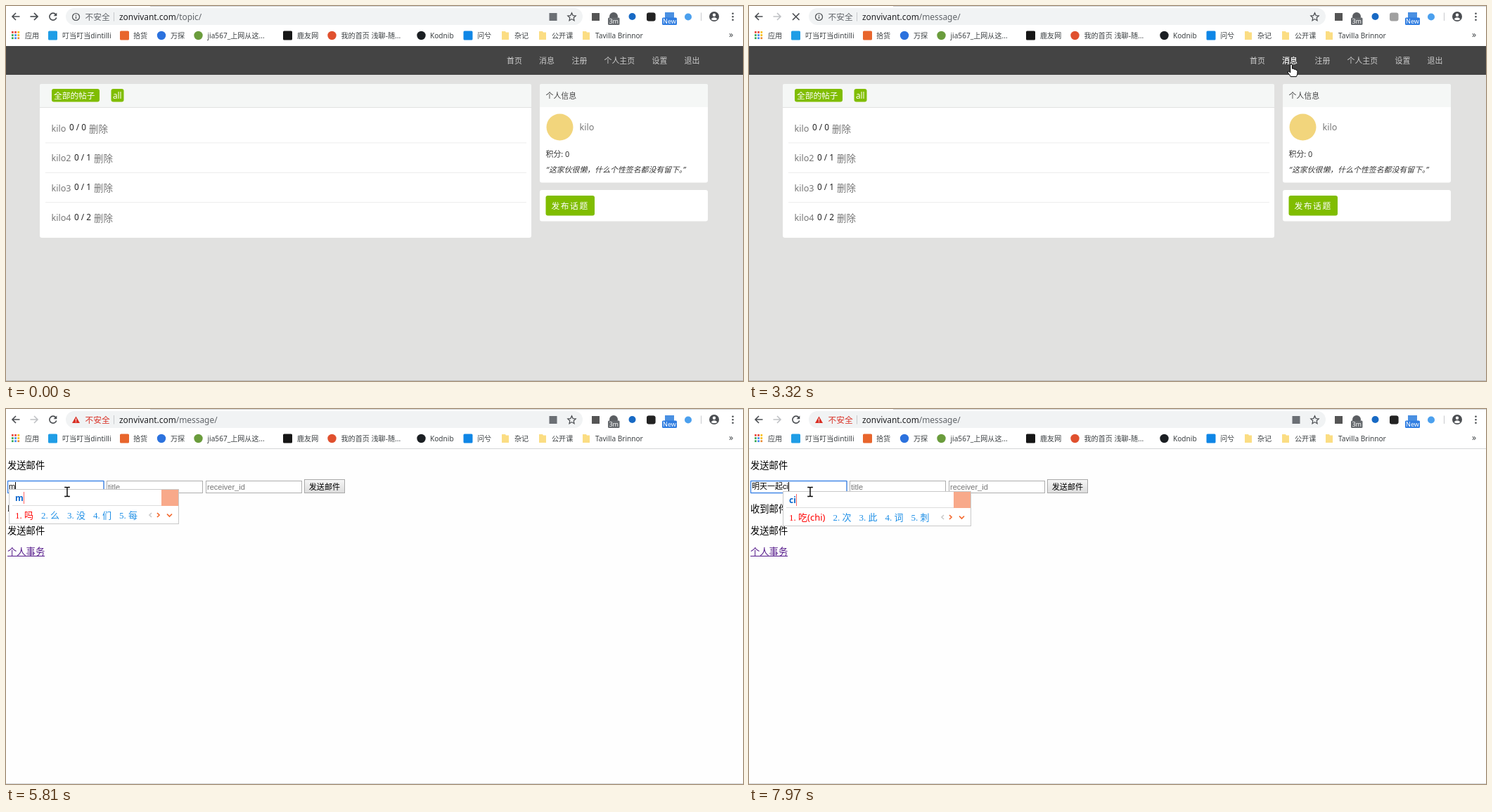
Write an HTML page that moves like this. It is 1048 by 534 pixels and loops after 8 s.

```html
<!DOCTYPE html>
<html lang="zh-CN">
<head>
<meta charset="utf-8">
<title>Forum messages</title>
<style>
  html, body { margin: 0; width: 100%; height: 100%; overflow: hidden; background: #fff; }
  body { position: relative; font-family: "Noto Sans", "Noto Sans CJK SC", "Noto Sans CJK", sans-serif; }
  svg.stage { position: absolute; left: 0; top: 0; width: 1048px; height: 534px; }
  .url { font-size: 11.9px; fill: #202124; }
  .url .dim { fill: #5f6368; }
  .url .warn { fill: #d93025; }
  .marks { font-size: 10.1px; fill: #3c4043; }
  .nav { font-size: 10.9px; fill: #ccc; }
  .side { font-size: 10.9px; fill: #333; }
  .row { font-size: 12.6px; fill: #777; }
  .row .count { font-size: 11.8px; fill: #222; }
  .row .del { font-size: 13.4px; }
  .mail { font-size: 13.3px; }
  .hint { font: 11px "Liberation Sans", "Noto Sans CJK SC", sans-serif; fill: #757575; }
  .line { fill: none; stroke: #4a4d51; stroke-width: 1.6; }

  .typed { position: absolute; left: 4px; top: 104.4px; white-space: pre; border-right: 1px solid #000;
    font: 11px/13px "Liberation Sans", "Noto Sans CJK SC", "Noto Sans CJK", sans-serif; }
  .ime { position: absolute; box-sizing: border-box; height: 50px; padding: 0 7px 0 8.5px;
    border: 1px solid #c9c9c9; background: #fff; white-space: nowrap; font-size: 13px; color: #1e8fe6; }
  .ime .pinyin { height: 22px; font: bold 12px/23px "Open Sans", sans-serif; color: #0a66cc; }
  .ime .pinyin span { border-right: 1px solid #f66; }
  .ime .list { display: flex; align-items: center; gap: 11px; height: 25px;
    border-top: 1px solid #ddd; margin: 0 -5px 0 -4px; padding: 0 5px 0 4px; }
  .ime .list b { display: inline-block; width: 1em; font: 13px "Liberation Serif", serif; }
  .ime .list span:first-child { color: #f00; }
  .ime .logo { position: absolute; right: 0; top: 0; width: 24px; height: 23px; background: #f8a98a; }

  #cursor { animation: move 8s linear infinite; }
  #cursor path { fill: #fff; stroke: #000; stroke-linejoin: round; }
  @keyframes move {
    0%, .95% { transform: translate(966px, 545px); }
    1% { transform: translate(963px, 520px); }
    4% { transform: translate(840px, 370px); }
    6.8% { transform: translate(739px, 225px); }
    8.5% { transform: translate(752px, 178px); }
    10.4%, 11.1% { transform: translate(771px, 155px); }
    19.4%, 23.2% { transform: translate(771px, 87px); }
    24%, 45% { transform: translate(771px, 83px); }
    47.75%, 49.2% { transform: translate(312px, 151px); }
    50.5% { transform: translate(280px, 155px); }
    53.5% { transform: translate(142px, 138px); }
    56.5%, 59.7% { transform: translate(86.3px, 118px); }
    59.8%, 100% { transform: translate(87px, 118px); }
  }
</style>
</head>
<body>
<svg class="stage" viewBox="0 0 1048 534">
  <!-- topic page -->
  <g data-show="0 3420">
    <rect y="57" width="1048" height="477" fill="#e1e1e0"/>
    <rect y="57" width="1048" height="41" fill="#444"/>
    <g class="nav">
      <text x="712" y="82.3">首页</text><text x="758" y="82.3">消息</text><text x="804.5" y="82.3">注册</text>
      <text x="850.5" y="82.3">个人主页</text><text x="918.5" y="82.3">设置</text><text x="964.5" y="82.3">退出</text>
      <text x="758" y="82.3" fill="#fff" data-show="1470">消息</text>
    </g>
    <rect x="48" y="111" width="699" height="219" rx="3" fill="#fff"/>
    <path d="M48 144.5V114a3 3 0 0 1 3-3H744a3 3 0 0 1 3 3V144.5z" fill="#f5f7f6"/>
    <path d="M48 144.5H747" stroke="#e2e2e2"/>
    <g fill="#80bd01">
      <rect x="65" y="118" width="68" height="18.5" rx="3"/>
      <rect x="149.5" y="118" width="18" height="18.5" rx="3"/>
    </g>
    <g fill="#fff" font-size="11.7"><text x="68" y="132">全部的帖子</text><text x="152" y="132">all</text></g>
    <g id="rows" class="row"></g>

    <g class="side">
      <rect x="759" y="111" width="239" height="140.5" rx="3" fill="#fff"/>
      <path d="M759 144V114a3 3 0 0 1 3-3H995a3 3 0 0 1 3 3V144z" fill="#f5f7f6"/>
      <text x="767.5" y="131.8" fill="#444">个人信息</text>
      <circle cx="787.5" cy="172.5" r="19" fill="#f2d57c"/>
      <text x="815.5" y="177" font-size="12.6" fill="#777">kilo</text>
      <text x="767.5" y="215.2">积分: 0</text>
      <text x="768" y="237.2" font-style="italic">“这家伙很懒，什么个性签名都没有留下。”</text>
      <rect x="759" y="262" width="239" height="44.5" rx="3" fill="#fff"/>
      <rect x="767.5" y="270" width="69.5" height="28.5" rx="3" fill="#80bd01"/>
      <text x="775.5" y="289.4" font-size="11.8" letter-spacing="1.5" fill="#fff">发布话题</text>
    </g>
    <path d="M0 533.5H1048" stroke="#b9b9b9"/>
  </g>

  <!-- message page -->
  <g data-show="3420">
    <rect y="57" width="1048" height="477" fill="#fefefe"/>
    <path d="M0 56.5H1048M0 533.5H1048" stroke="#d5d6d8"/>
    <g class="mail">
      <text x="2" y="84.6">发送邮件</text><text x="2" y="147">收到邮件</text><text x="2" y="177.5">发送邮件</text>
      <text x="2" y="207.6" fill="#551a8b">个人事务</text>
      <path d="M2 209.5H55" stroke="#551a8b"/>
    </g>
    <g fill="#fff" stroke="#adadad">
      <rect x="2.5" y="102.5" width="136.5" height="17"/>
      <rect x="143.5" y="102.5" width="136" height="17"/>
      <rect x="284.5" y="102.5" width="136" height="17"/>
      <rect x="2.5" y="102.5" width="136.5" height="17" rx=".5" stroke="#4489e8" stroke-width="1.4" data-show="4780"/>
    </g>
    <linearGradient id="face" x2="0" y2="1"><stop stop-color="#f6f6f6"/><stop offset="1" stop-color="#dcdcdc"/></linearGradient>
    <rect x="424.5" y="100.5" width="57" height="19" fill="url(#face)" stroke="#a9a9a9"/>
    <g class="hint">
      <text x="4" y="115" data-show="3420 5810">content</text><text x="145" y="115">title</text><text x="286" y="115">receiver_id</text>
      <text x="430.7" y="115.2" font-size="11.1" fill="#000">发送邮件</text>
    </g>
    <path d="M4.5 105V117" stroke="#000" data-show="4780 5360"/>
  </g>

  <!-- browser bar -->
  <path d="M205 .5H1048" stroke="#cfd1d4"/>
  <rect x="85" y="3" width="735" height="24" rx="12" fill="#f1f3f4"/>
  <g class="line">
    <path d="M19.5 15H9M14 10L9 15L14 20"/>
    <path d="M34.5 15H45M40 10L45 15L40 20" stroke="#c0c2c5"/>
    <path d="M34.5 15H45M40 10L45 15L40 20" data-show="0 3320"/>
    <g data-show="0 2980 3420">
      <path d="M70.8 12A5 5 0 1 0 71.7 16.5"/><path d="M72.3 9.5V14.2H67.6z" fill="#4a4d51" stroke="none"/>
    </g>
    <path d="M62 10.5L71.5 20M71.5 10.5L62 20" data-show="2980 3420"/>
    <g data-show="0 5810" stroke-width="1.2">
      <circle cx="99.5" cy="15.5" r="5"/><path d="M99.5 14.8V18.3M99.5 12.5V13.7"/>
    </g>
    <path d="M804.5 9.8L806.2 13.6L810.2 14L807.2 16.7L808 20.7L804.5 18.6L801 20.7L801.8 16.7L798.8 14L802.8 13.6z" stroke-width="1.2"/>
    <path d="M153.5 9V21.5M988.5 9.5V21" stroke="#c8cacd" stroke-width="1"/>
  </g>
  <g data-show="5810">
    <path d="M99.5 10.5L105 20H94z" fill="#d93025"/><path d="M99.5 13.5V16.8M99.5 17.7V18.9" stroke="#fff"/>
  </g>
  <g class="url">
    <text x="112.5" y="19.8" font-size="11.7" class="dim" data-show="0 5810">不安全</text>
    <text x="112.5" y="19.8" font-size="11.7" class="warn" data-show="5810">不安全</text>
    <text x="161" y="19.5" data-show="0 3320">zonvivant.com<tspan class="dim">/topic/</tspan></text>
    <text x="161" y="19.5" data-show="3320">zonvivant.com<tspan class="dim">/message/</tspan></text>
  </g>
  <rect x="772.5" y="10" width="11" height="11" fill="#6b6f74" data-show="0 3320 3420"/>
  <rect x="833" y="10" width="11" height="11" fill="#555"/>
  <circle cx="864" cy="15" r="6" fill="#5a5d61"/>
  <circle cx="890.5" cy="15" r="5" fill="#1769c4"/>
  <rect x="911" y="9.5" width="12.5" height="12" rx="3" fill="#a0a0a0"/>
  <rect x="911" y="9.5" width="12.5" height="12" rx="3" fill="#222" data-show="0 3320 3420"/>
  <rect x="937" y="9" width="13" height="12" fill="#4a90e2"/>
  <circle cx="970" cy="15.5" r="5" fill="#4ba0ee"/>
  <rect x="856" y="16.5" width="16.5" height="10.5" rx="1.5" fill="#666a6e"/>
  <rect x="933" y="16.5" width="21" height="10.5" rx="1.5" fill="#2f7de1"/>
  <g font-size="9" fill="#fff" text-anchor="middle"><text x="864.2" y="25">3m</text><text x="943.5" y="25">New</text></g>
  <circle cx="1007" cy="15" r="7" fill="#4a4d51"/>
  <circle cx="1007" cy="12.8" r="2.2" fill="#fff"/><path d="M1002.5 18.7Q1007 14 1011.5 18.7Q1007 22 1002.5 18.7z" fill="#fff"/>
  <path d="M1033.5 10.8v.01M1033.5 15.3v.01M1033.5 19.8v.01" stroke="#4a4d51" stroke-width="2.6" stroke-linecap="round"/>

  <g id="bookmarks" class="marks"><text x="27" y="45.8">应用</text><text x="1028" y="45" font-size="12">»</text></g>
</svg>

<div id="typing"></div>

<svg class="stage" viewBox="0 0 1048 534">
  <g id="cursor">
    <path data-show="0 1470 3620 4440" d="M0 0V16L4 12.5L6.5 18L9 17L6.5 11.5H11.5z"/>
    <path data-show="1470 3620" d="M-1.3 10V1.3a1.4 1.3 0 0 1 2.8 0V6.2q2.6-.6 2.8 1 2.4-.5 2.6 1 2-.2 2 1.4v3.2q0 2-1.6 4.8H-.8q-1-2.4-4-5.6-.6-1.8 1-1.9 1.4.3 2.5 1.9z"/>
    <path data-show="4440" style="fill:none;stroke-width:1.4" d="M-3.8-6.5H-.8L0-6L.8-6.5H3.8M0-6V6M-3.8 6.5H-.8L0 6L.8 6.5H3.8"/>
  </g>
</svg>

<script>
const LOOP = 8000;
const byId = id => document.getElementById(id);
const add = (id, html) => byId(id).insertAdjacentHTML('beforeend', html);

// Topic list
['0 / 0', '0 / 1', '0 / 1', '0 / 2'].forEach((count, i) => {
  const y = 179 + i * 42.4, x = i ? 97 : 90;
  add('rows', `<text x="64.5" y="${y}">kilo${i ? i + 1 : ''}</text>
    <text class="count" x="${x}" y="${y - 1.7}">${count}</text>
    <text class="del" x="${x + 28}" y="${y + .5}">删除</text>`);
  if (i) add('rows', `<path d="M56 ${y - 26.5}H740" stroke="#ececec"/>`);
});

// Bookmark bar
['#e94235', '#e94235', '#fbbc05', '#34a853', '#4285f4', '#fbbc05', '#34a853', '#4285f4', '#e98b35'].forEach((color, i) =>
  add('bookmarks', `<rect x="${8 + i % 3 * 4.2}" y="${36 + (i / 3 | 0) * 4.2}" width="2.7" height="2.7" fill="${color}"/>`));
const square = (x, color) => `<rect x="${x - 6.5}" y="35.5" width="13" height="13" rx="1.5" fill="${color}"/>`;
const disc = (x, color) => `<circle cx="${x}" cy="42" r="6.2" fill="${color}"/>`;
const folder = x => `<path d="M${x - 5} 36h5l1 1.5h4V48h-10z" fill="#fbdd83"/>`;
[
  [80, '叮当叮当dintilli', square(66.5, '#1f9de6')],
  [181, '拾货', square(168.5, '#e8652c')],
  [234, '万探', disc(221, '#2c72de')],
  [286.5, 'jia567_上网从这...', disc(273.5, '#6a9c3c')],
  [414, '鹿友网', square(400.5, '#161616')],
  [476.5, '我的首页 浅聊-随...', disc(463.5, '#e0502e')],
  [603, 'Kodnib', disc(590.5, '#1b1f23')],
  [670, '问兮', square(657, '#0f86e6')],
  [723, '杂记', folder(710)],
  [776, '公开课', folder(763)],
  [838, 'Tavilla Brinnor', folder(825)]
].forEach(([x, label, icon]) => add('bookmarks', `${icon}<text x="${x}" y="45.8">${label}</text>`));

// Pinyin typing: [time, committed text, pinyin, candidates]
const tomorrow = '明天 明天见 名曲 明年 命题';
const together = '一起 一气呵成 一起出去 一起走吧 一起去吧';
const steps = [
  [5810, '', 'm', '吗 么 没 们 每'],
  [5900, '', 'mi', '米 密 秘 迷 蜜'],
  [5990, '', 'min', '民 敏 闽 皿 悯'],
  [6090, '', 'ming', '名 明 命 鸣 铭'],
  [6180, '', 'mingt', tomorrow],
  [6270, '', 'mingtian', tomorrow],
  [6370, '明天', ''],
  [6550, '明天', 'y', '有 也 一 要 用'],
  [6680, '明天', 'yi', '一 以 已 亿 易'],
  [6910, '明天', 'yiq', together],
  [7050, '明天', 'yiqi', together],
  [7230, '明天一起', ''],
  [7770, '明天一起', 'c', '从 才 次 吃 错'],
  [7840, '明天一起', 'ci', '吃(chi) 次 此 词 刺']
];
const arrows = `<svg width="36" height="10" style="margin-left:4px" fill="none" stroke-width="1.7">
  <path d="M5 2L2 5L5 8" stroke="#ccc"/><path d="M13 2L16 5L13 8M27 3.5L30.5 7L34 3.5" stroke="#f4692e"/></svg>`;
const imeWindow = (done, pinyin, words) => `
  <div class="ime" style="left:${3.5 + done.length * 11}px;top:${done.length > 2 ? 117 : 114}px">
    <div class="logo"></div><div class="pinyin"><span>${pinyin}</span></div>
    <div class="list">${words.split(' ').map((word, i) => `<span><b>${i + 1}.</b>${word}</span>`).join('')}${arrows}</div>
  </div>`;
steps.forEach(([time, done, pinyin, words], i) => {
  const end = steps[i + 1] ? steps[i + 1][0] : '';
  add('typing', `<div data-show="${time} ${end}"><span class="typed">${done}${pinyin}</span>
    ${pinyin && imeWindow(done, pinyin, words)}</div>`);
});

// data-show lists the times at which an element toggles, first on, then off
document.querySelectorAll('[data-show]').forEach(el => {
  const times = el.dataset.show.trim().split(' ').map(Number);
  const frames = times.map((time, i) => ({ offset: time / LOOP, opacity: (i + 1) % 2 }));
  if (times[0] > 0) frames.unshift({ offset: 0, opacity: 0 });
  frames.push({ offset: 1, opacity: times.length % 2 });
  frames.forEach(frame => frame.easing = 'step-end');
  el.animate(frames, { duration: LOOP, iterations: Infinity });
});
</script>
</body>
</html>
```
